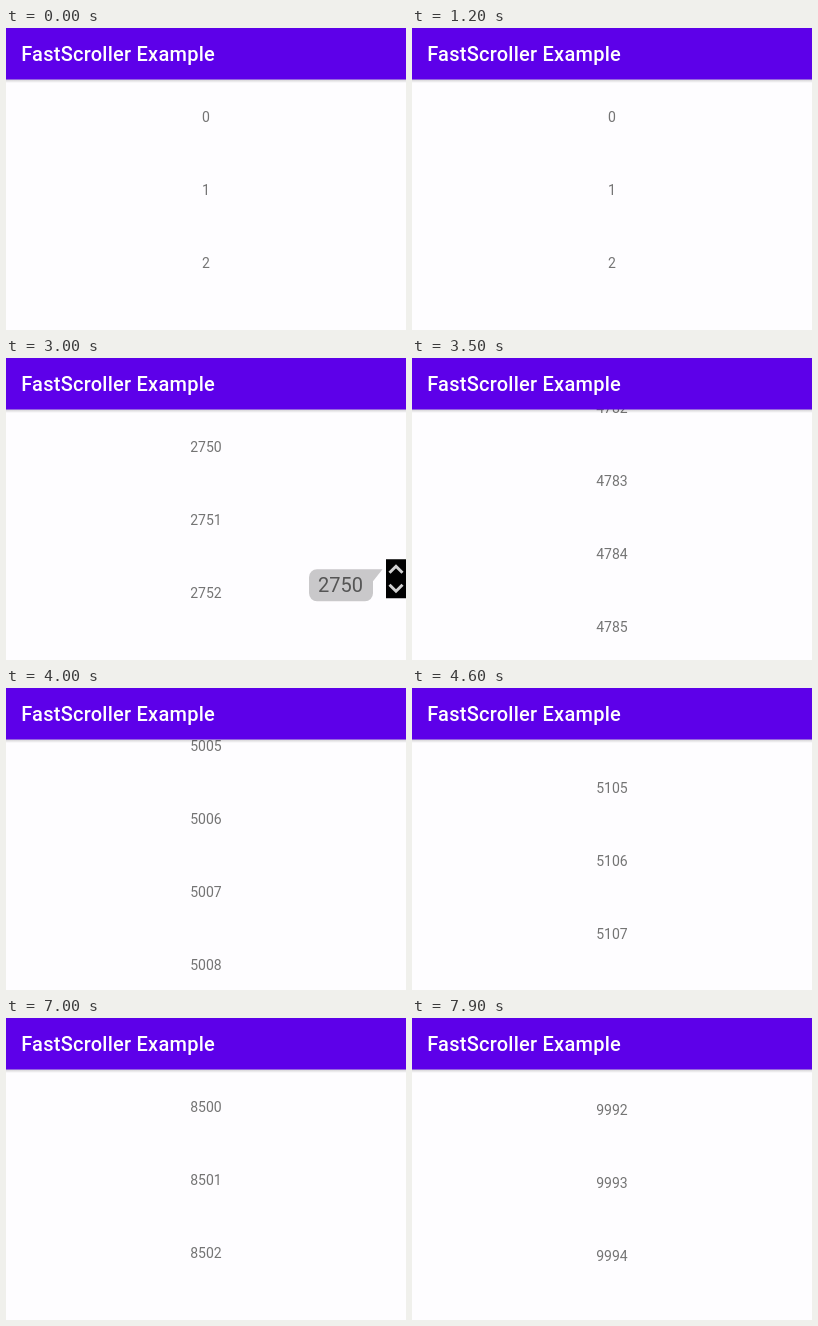
Animation, 400 px wide and 302 px high, one loop 8 s. Source, as an HTML page:

```html
<!DOCTYPE html>
<html lang="en">
<head>
<meta charset="utf-8">
<title>FastScroller Example</title>
<style>
  html, body { margin: 0; width: 100%; height: 100%; overflow: hidden; background: #fefdff; }
  svg { display: block; width: 400px; height: 302px; font-family: Roboto, sans-serif; }
  #rows { font-size: 14px; fill: #747474; text-anchor: middle; }
  #title { font-size: 20px; font-weight: 500; letter-spacing: .25px; fill: #fff; }
  #label { font-size: 20px; fill: #555; text-anchor: end; }
</style>
</head>
<body>
<svg viewBox="0 0 400 302">
  <defs>
    <linearGradient id="shade" x2="0" y2="1">
      <stop stop-color="#000" stop-opacity=".2"/>
      <stop offset="1" stop-color="#000" stop-opacity="0"/>
    </linearGradient>
  </defs>
  <rect width="400" height="302" fill="#fefdff"/>
  <g id="rows"></g>
  <g id="thumb">
    <rect x="380" width="20" height="39"/>
    <path d="M383.5 13.5l6.5-6.5 6.5 6.5M383.5 25.5l6.5 6.5 6.5-6.5" fill="none" stroke="#d0d0d0" stroke-width="3"/>
  </g>
  <g id="popup">
    <path id="bubble" fill="#c9c8ca"/>
    <text id="label" x="357" y="33"></text>
  </g>
  <rect y="51" width="400" height="4" fill="url(#shade)"/>
  <rect width="400" height="51.5" fill="#5d00e9"/>
  <text id="title" x="15.2" y="32.5">FastScroller Example</text>
</svg>
<script>
const LOOP = 8000, STEP = 100, ROW = 73, TOP = 52;
const THUMB_PER_ITEM = 47 / 866;   // the track runs on below the visible stage

// [time in ms, scroll position in items]
const scroll = [
  [0, 0], [1200, 0], [1500, 0.9], [1800, 1.4], [2300, 1.4], [2600, 865.973],
  [3000, 2750], [3300, 4250], [3500, 4782.534], [4100, 5050], [4600, 5104.849],
  [4900, 5108.2], [5200, 5108.2], [5600, 5390], [5900, 5390],
  [6200, 6234.753], [7000, 8500], [7700, 9991.959], [LOOP, 9991.959]
];

const $ = id => document.getElementById(id);
const rows = Array.from({ length: 6 }, () => {
  const text = document.createElementNS("http://www.w3.org/2000/svg", "text");
  text.setAttribute("x", 200);
  return $("rows").appendChild(text);
});

function positionAt(t) {
  const next = scroll.findIndex(([time]) => time > t);
  const [t0, p0] = scroll[next - 1], [t1, p1] = scroll[next];
  return p0 + (p1 - p0) * (t - t0) / (t1 - t0);
}

function draw(t) {
  const position = positionAt(t);
  const first = Math.floor(position);
  rows.forEach((text, i) => {
    const item = first + i - 1;
    text.textContent = item < 0 ? "" : item;
    text.setAttribute("y", 94 + (item - position) * ROW);
  });

  const move = `translate(0 ${TOP + position * THUMB_PER_ITEM})`;
  $("thumb").setAttribute("transform", move);
  $("popup").setAttribute("transform", move);
  $("thumb").style.display = t >= 1400 ? "" : "none";
  $("popup").style.display = t >= 2400 ? "" : "none";

  const value = String(Math.round(position));
  const left = 348 - value.length * 11.24;
  $("label").textContent = value;
  $("bubble").setAttribute("d",
    `M${left + 8} 10H376.5L367 22V34a8 8 0 0 1-8 8H${left + 8}a8 8 0 0 1-8-8V18a8 8 0 0 1 8-8Z`);
}

const start = performance.now();
function tick() {
  const elapsed = performance.now() - start + 5;
  draw(Math.floor(elapsed % LOOP / STEP) * STEP);
  requestAnimationFrame(tick);
}
tick();
</script>
</body>
</html>
```
